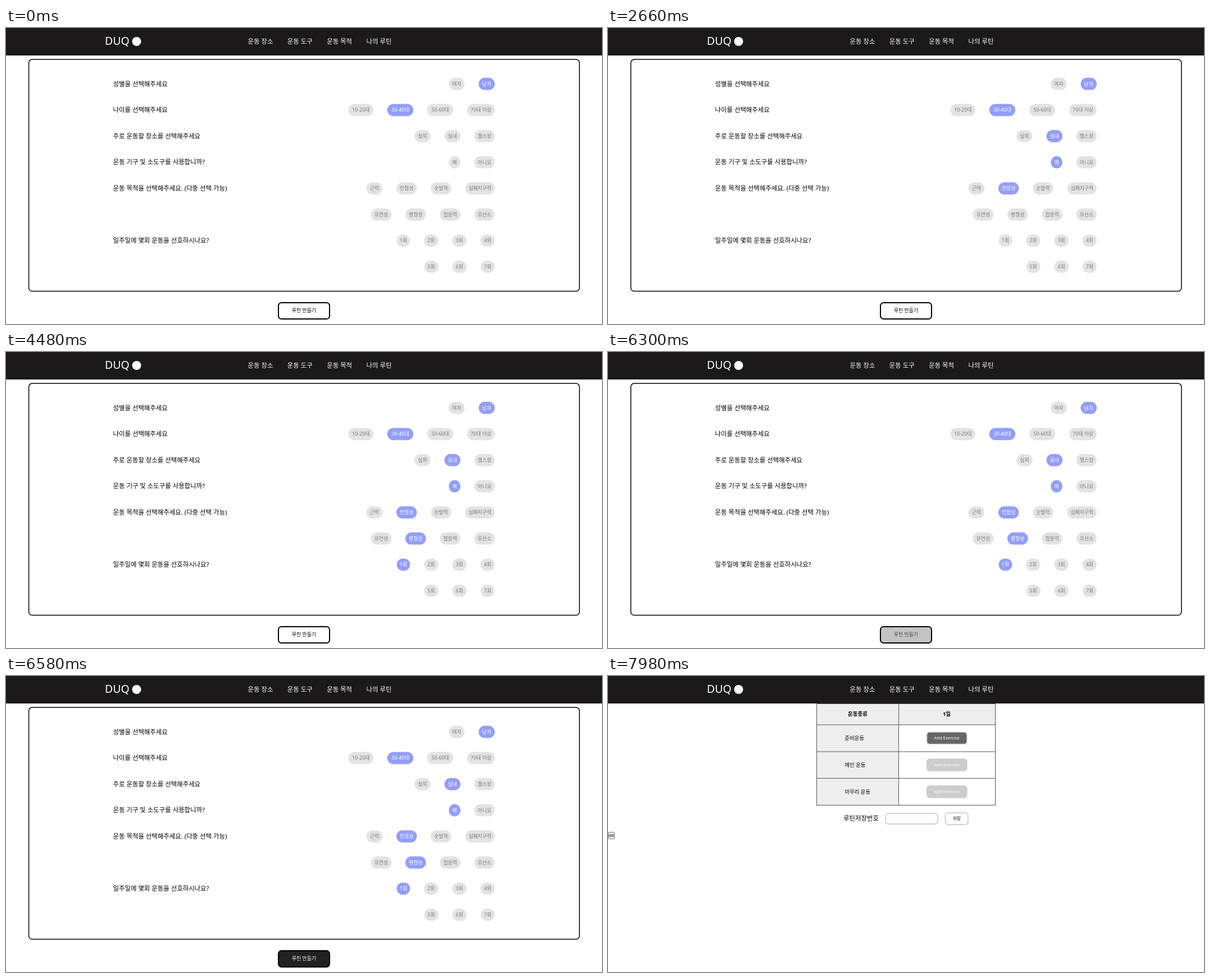
An HTML page for the animation above (8 s loop, 1061 by 528 pixels).

```html
<!DOCTYPE html>
<html>
<head>
<meta charset="utf-8">
<title>Routine builder</title>
<style>
  html, body { margin: 0; width: 100%; height: 100%; overflow: hidden; background: #fff; }
  svg { display: block; width: 1061px; height: 528px; }
  text { font: 11.4px 'Noto Sans', 'Noto Sans CJK KR', 'Noto Sans CJK', sans-serif; white-space: pre; }
  .mid { text-anchor: middle; }
  .nav text { fill: #fff; }
  .nav .brand { font-size: 19.5px; font-weight: 300; }

  .pill { fill: #e3e3e3; color: #777; }
  .pill text { fill: currentColor; font-size: 8.85px; }
  .on { fill: #929ef9; color: #fff; }

  .make { fill: #222; color: #fff; }
  .make text { fill: currentColor; font-size: 8.85px; font-weight: 500; }

  .cell { font-size: 9.4px; }
  .head { font-size: 9.5px; font-weight: 700; }
  .add { fill: #ccc; stroke: #ccc; stroke-width: 1.3; }
  .label { fill: #fff; font-size: 7.6px; }
  .field { fill: #fff; stroke: #c4c4c4; stroke-width: 1.4; }
  .small { font-size: 7.7px; }

  .anim { animation: 8s step-end infinite; }
  .place { animation-name: place; }
  .tool { animation-name: tool; }
  .agility { animation-name: agility; }
  .balance { animation-name: balance; }
  .weekly { animation-name: weekly; }
  .make { animation-name: make; }
  .result { animation-name: result; }
  .hover { animation-name: hover; }

  @keyframes place   { 0% { fill: #e3e3e3; color: #777 } 1.75%   { fill: #929ef9; color: #fff } }
  @keyframes tool    { 0% { fill: #e3e3e3; color: #777 } 18.375% { fill: #929ef9; color: #fff } }
  @keyframes agility { 0% { fill: #e3e3e3; color: #777 } 33.25%  { fill: #929ef9; color: #fff } }
  @keyframes balance { 0% { fill: #e3e3e3; color: #777 } 44.625% { fill: #929ef9; color: #fff } }
  @keyframes weekly  { 0% { fill: #e3e3e3; color: #777 } 56%     { fill: #929ef9; color: #fff } }
  @keyframes make {
    0%      { fill: #fff; color: #000 }
    78.75%  { fill: #c3c3c3; color: #454545 }
    79.625% { fill: #626262; color: #b5b5b5 }
    80.5%   { fill: #343434; color: #ebebeb }
    81.375% { fill: #242424; color: #fdfdfd }
    82.25%  { fill: #222; color: #fff }
  }
  @keyframes result { 0% { visibility: hidden } 87.5% { visibility: visible } }
  @keyframes hover {
    0%      { fill: #ccc }
    98.875% { fill: #b6b6b6 }
    99.75%, 100% { fill: #666 }
  }
</style>
</head>
<body>
<svg viewBox="0 0 1061 528">
  <g id="form">
    <rect x="40.6" y="56.1" width="980.2" height="413.4" rx="6" fill="#fff" stroke="#000" stroke-width="1.5"/>
    <g class="make anim">
      <rect x="485" y="490" width="91" height="29" rx="5.5" stroke="#000" stroke-width="2"/>
      <text class="mid" x="530.5" y="507.3">루틴 만들기</text>
    </g>
  </g>

  <g class="result anim">
    <rect y="49" width="1061" height="479" fill="#fff"/>
    <path d="M371.5 49H689.5V87H517.5V230.5H371.5Z" fill="#eee"/>
    <path d="M371.5 49.5H689.5V230.5H371.5ZM371.5 87H689.5M371.5 135H689.5M371.5 182.5H689.5M517.5 49.5V230.5"
          fill="none" stroke="#555"/>
    <text class="head mid" x="444.5" y="71.4">운동종류</text>
    <text class="head mid" x="603" y="71.4">1일</text>
    <g id="routine"></g>
    <text x="419" y="258.2">루틴저장번호</text>
    <rect class="field" x="494.2" y="245.2" width="92.8" height="18.8" rx="5"/>
    <rect class="field" x="600.5" y="244" width="40.5" height="21" rx="5"/>
    <text class="small mid" x="620.8" y="257">저장</text>
    <rect x="0.5" y="278.7" width="11" height="11.8" rx="1.5" fill="#efefef" stroke="#767676"/>
    <text class="small mid" x="6" y="287.2">dd</text>
  </g>

  <g class="nav">
    <rect width="1061" height="49" fill="#1b191a"/>
    <text class="brand" x="176" y="30">DUQ</text>
    <circle cx="232.5" cy="24" r="8" fill="#fff"/>
    <text x="430.5" y="28">운동 장소</text>
    <text x="500.8" y="28">운동 도구</text>
    <text x="571.2" y="28">운동 목적</text>
    <text x="641.5" y="28">나의 루틴</text>
  </g>
</svg>
<script>
  // Each option: label, width, optional state classes
  const rows = [
    ['성별을 선택해주세요', ['여자', 28.5], ['남자', 28.5, 'on']],
    ['나이를 선택해주세요', ['10-20대', 44.5], ['30-40대', 46.3, 'on'], ['50-60대', 46.3], ['70대 이상', 49]],
    ['주로 운동할 장소를 선택해주세요', ['실외', 28.5], ['실내', 28.5, 'on anim place'], ['헬스장', 36.2]],
    ['운동 기구 및 소도구를 사용합니까?', ['예', 20.7], ['아니요', 36.2, 'on anim tool']],
    ['운동 목적을 선택해주세요. (다중 선택 가능)', ['근력', 28.5], ['민첩성', 36.5, 'on anim agility'], ['순발력', 36.5], ['심폐지구력', 52.5]],
    ['', ['유연성', 36.6], ['평형성', 36.6, 'on anim balance'], ['협응력', 36.6], ['유산소', 36.2]],
    ['일주일에 몇회 운동을 선호하시나요?', ['1회', 23.8, 'on anim weekly'], ['2회', 25.4], ['3회', 25.4], ['4회', 25.4]],
    ['', ['5회', 25.3], ['6회', 25.6], ['7회', 25]]
  ];
  // The equipment answer that gets picked is the first one
  rows[3][1][2] = rows[3][2].pop();

  const right = 870, gap = 24.8, pitch = 46.6;
  const add = (id, html) => document.getElementById(id).insertAdjacentHTML('beforeend', html);

  rows.forEach(([question, ...options], i) => {
    const y = 99.7 + i * pitch;
    let x = right;
    add('form', `<text x="190.5" y="${y + 3.9}">${question}</text>`);
    for (const [label, width, state = ''] of options.reverse()) {
      x -= width;
      add('form', `<g class="pill ${state}">
        <rect x="${x}" y="${y - 10.9}" width="${width}" height="21.8" rx="10.9"/>
        <text class="mid" x="${x + width / 2}" y="${y + 3}">${label}</text></g>`);
      x -= gap;
    }
  });

  ['준비운동', '메인 운동', '마무리 운동'].forEach((name, i) => {
    const y = 110.8 + i * 47.8;
    add('routine', `<text class="cell" x="421.5" y="${y + 3.4}">${name}</text>
      <rect class="add ${i ? '' : 'anim hover'}" x="567.7" y="${y - 10.6}" width="71.2" height="21.2" rx="5"/>
      <text class="label mid" x="603.2" y="${y + 2.5}">Add Exercise</text>`);
  });
</script>
</body>
</html>
```
